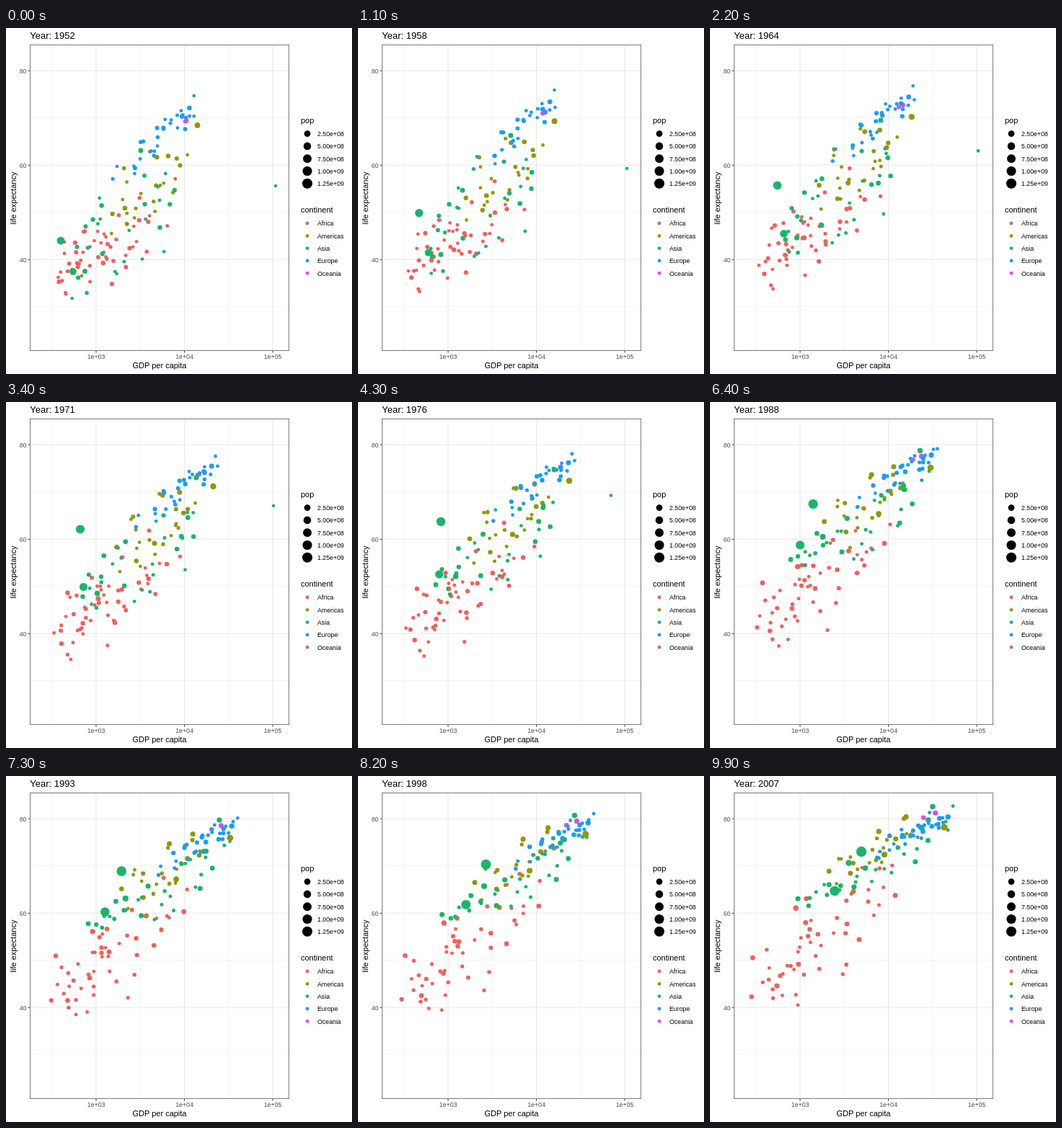
Recreate the animation shown at these times as an HTML page. Size 480 px wide and 480 px high, loop 10 s.

```html
<!DOCTYPE html>
<html lang="en">
<head>
<meta charset="utf-8">
<title>Life expectancy and GDP</title>
<style>
  html, body { margin: 0; width: 100%; height: 100%; overflow: hidden; background: #fff; }
  svg { display: block; width: 480px; height: 480px; font-family: "Liberation Sans", Arial, sans-serif; }
  text { font-size: 11px; }
  .title { font-size: 13px; }
  .small { font-size: 8.8px; }
  .tick { font-size: 8.8px; fill: #4d4d4d; }
  .mid { text-anchor: middle; }
  .end { text-anchor: end; }
</style>
</head>
<body>
<svg id="stage" viewBox="0 0 480 480"></svg>
<script>
const stage = document.getElementById('stage');
const FRAMES = 100, FRAME_MS = 100, LAST = FRAMES - 1;

const COLORS = {
  Africa: '#f35e5a', Americas: '#929705', Asia: '#18b56a', Europe: '#189df4', Oceania: '#e34bef'
};

function add(tag, attrs, text) {
  const el = document.createElementNS('http://www.w3.org/2000/svg', tag);
  for (const name in attrs) el.setAttribute(name, attrs[name]);
  if (text) el.textContent = text;
  return stage.appendChild(el);
}
const line = (x1, y1, x2, y2, stroke, width = 1) =>
  add('line', { x1, y1, x2, y2, stroke, 'stroke-width': width });
const label = (x, y, text, cls = '') => add('text', { x, y, class: cls }, text);
const dot = (cx, cy, r, fill) => add('circle', { cx, cy, r, fill });

const lerp = (a, b, t) => a + (b - a) * t;
const radius = millions => 2.2 + 5 * Math.sqrt(millions / 1319);

function seeded(seed) {
  return () => {
    seed = (seed + 0x6d2b79f5) | 0;
    let t = Math.imul(seed ^ (seed >>> 15), 1 | seed);
    t = (t + Math.imul(t ^ (t >>> 7), 61 | t)) ^ t;
    return ((t ^ (t >>> 14)) >>> 0) / 4294967296;
  };
}

// Axes and grid
for (let i = 0; i < 3; i++) {
  const minorX = 63.8 + 122.5 * i, minorY = 124.5 + 131 * i;
  line(minorX, 24, minorX, 447, '#ebebeb', 0.6);
  line(34, minorY, 392, minorY, '#ebebeb', 0.6);
}
for (let i = 0; i < 3; i++) {
  const x = 125 + 122.5 * i, y = 59.3 + 131 * i;
  line(x, 24, x, 447, '#e8e8e8', 1.1);
  line(34, y, 392, y, '#e8e8e8', 1.1);
  line(x, 448, x, 450.5, '#333');
  line(30.5, y, 33, y, '#333');
  label(x, 459, `1e+0${3 + i}`, 'tick mid');
  label(28.5, y + 3.2, String(80 - 20 * i), 'tick end');
}

// Each crowd lies along a band from its poorest to its richest country
// [poor x, y, rich x, y, spread], and drifts from one band to the other.
const crowds = [
  { region: 'Oceania', count: 2, skew: 1, from: [248, 130, 251, 128, 0], to: [288, 61, 321, 48, 0] },
  { region: 'Africa', count: 52, skew: 1.6, from: [80, 335, 210, 270, 33], to: [85, 288, 245, 140, 42] },
  { region: 'Americas', count: 23, skew: 1, from: [150, 278, 242, 158, 34], to: [165, 145, 285, 65, 19] },
  { region: 'Asia', count: 28, skew: 1, from: [82, 328, 225, 215, 40], to: [125, 185, 325, 68, 17] },
  { region: 'Europe', count: 30, skew: 0.6, from: [145, 212, 258, 112, 12], to: [225, 110, 332, 53, 9] }
];

// The giants and one outlier follow their own paths: x, y at four key frames.
const KEYS = [0, 34, 64, 99];
const soloists = [
  { region: 'Asia', pop: [1, 3], path: [374, 219, 371, 144, 304, 96, 330, 75] },
  { region: 'Asia', pop: [86, 127], path: [187, 170, 264, 105, 291.5, 67.5, 309, 42.5] },
  { region: 'Asia', pop: [82, 224], path: [109.5, 337.5, 126.5, 265.5, 156.5, 187, 192.5, 120.5] },
  { region: 'Americas', pop: [57, 190], path: [165, 250, 206, 196, 234, 155, 242, 109] },
  { region: 'Americas', pop: [158, 301], path: [265.5, 135, 287.5, 117, 306, 91, 325, 71] },
  { region: 'Asia', pop: [372, 1110], path: [93, 338, 107.5, 256.5, 125, 198.5, 173, 159.5] },
  { region: 'Asia', pop: [556, 1319], path: [76, 295, 103, 176.5, 143, 141.5, 210, 105] }
];

const countries = [];

function addCrowd({ region, count, skew, from, to }) {
  const rand = seeded(count * 17 + 5);
  const bell = () => (rand() + rand() + rand() - 1.5) * 1.4;
  for (let n = 0; n < count; n++) {
    const rank = ((n + 0.5) / count) ** skew;
    const dx = [bell(), bell()], dy = [bell(), bell()];
    const pop = 2 + 60 * rand() ** 4;
    // Turning from one offset to the other keeps the crowd equally wide.
    const wander = ([a, b], t) => a * Math.cos(t * Math.PI / 2) + b * Math.sin(t * Math.PI / 2);
    const el = dot(0, 0, 2, COLORS[region]);
    countries.push({ el, at: frame => {
      const t = frame / LAST, eased = t ** 0.85;
      const [x0, y0, x1, y1, spread] = from.map((v, i) => lerp(v, to[i], eased));
      return {
        x: lerp(x0, x1, rank) + wander(dx, t) * spread * 0.6,
        y: lerp(y0, y1, rank) + wander(dy, t) * spread,
        r: radius(pop * (1 + t))
      };
    } });
  }
}

function addSoloist({ region, pop, path }) {
  const el = dot(0, 0, 2, COLORS[region]);
  countries.push({ el, at: frame => {
    const i = KEYS.findIndex((key, k) => frame <= KEYS[k + 1]);
    const t = (frame - KEYS[i]) / (KEYS[i + 1] - KEYS[i]);
    return {
      x: lerp(path[2 * i], path[2 * i + 2], t),
      y: lerp(path[2 * i + 1], path[2 * i + 3], t),
      r: lerp(radius(pop[0]), radius(pop[1]), frame / LAST)
    };
  } });
}

crowds.forEach(addCrowd);
soloists.forEach(addSoloist);

// Border, titles and legends
add('rect', { x: 33.5, y: 23.5, width: 359, height: 424, fill: 'none', stroke: '#7a7a7a' });
const title = label(33.3, 15, 'Year: 1952', 'title');
label(213, 472, 'GDP per capita', 'mid');
add('text', { transform: 'translate(13.5 236) rotate(-90)', class: 'mid' }, 'life expectancy');

label(409, 132, 'pop');
for (let i = 0; i < 5; i++) {
  const y = 146.6 + 17.3 * i, millions = 250 * (i + 1);
  dot(418, y, radius(millions), '#000');
  label(432, y + 3.4, (millions * 1e6).toExponential(2).replace('+', '+0'), 'small');
}
label(409, 256, 'continent');
Object.keys(COLORS).forEach((name, i) => {
  const y = 271 + 17.3 * i;
  dot(418, y, 2.4, COLORS[name]);
  label(432, y + 3.4, name, 'small');
});

function draw(frame) {
  title.textContent = 'Year: ' + Math.round(1952 + 55 * frame / LAST);
  for (const { el, at } of countries) {
    const { x, y, r } = at(frame);
    el.setAttribute('cx', x.toFixed(2));
    el.setAttribute('cy', y.toFixed(2));
    el.setAttribute('r', r.toFixed(2));
  }
}

const start = performance.now();
function tick() {
  const elapsed = performance.now() - start;
  draw(Math.floor(elapsed / FRAME_MS) % FRAMES);
  requestAnimationFrame(tick);
}
draw(0);
requestAnimationFrame(tick);
</script>
</body>
</html>
```
